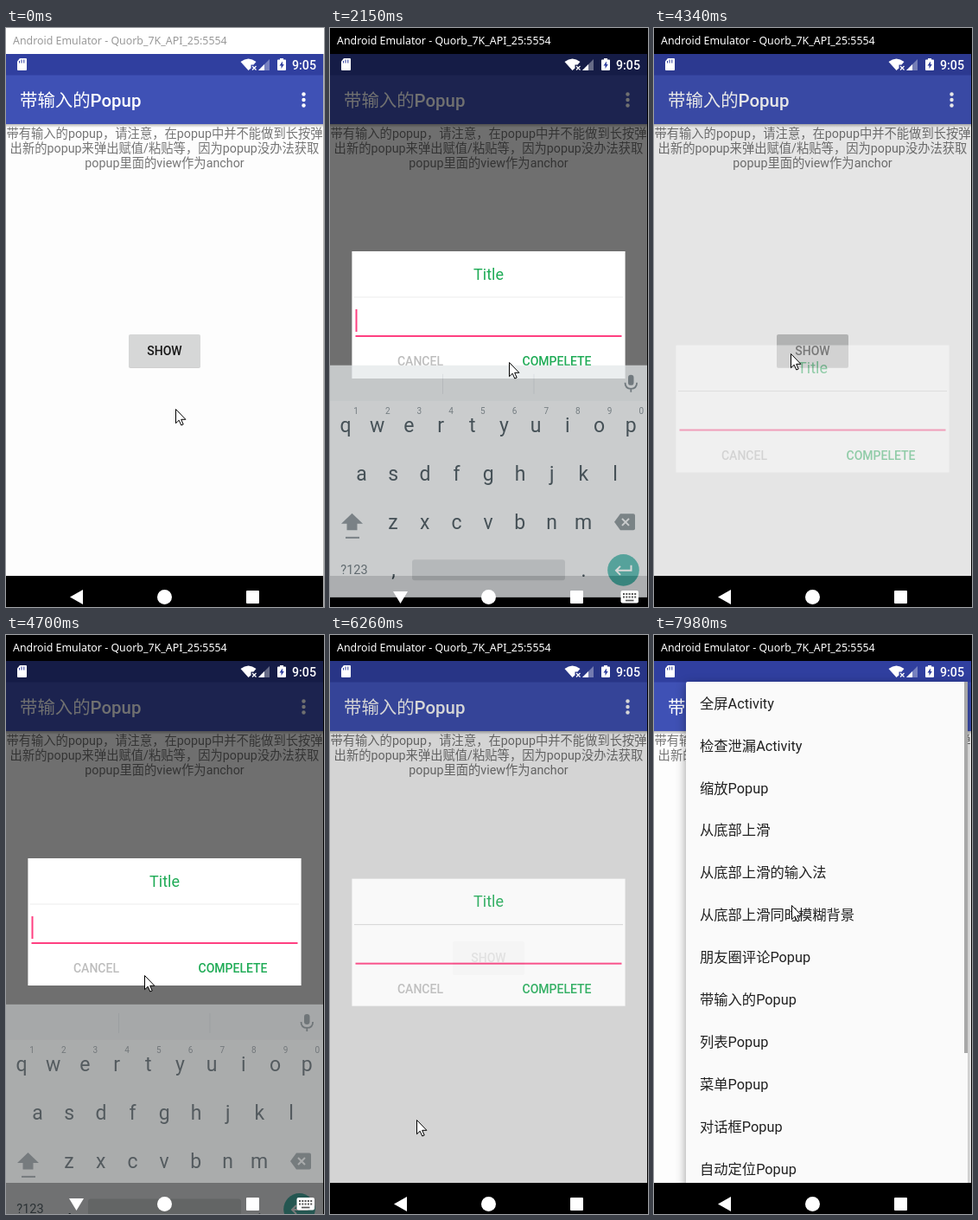
These frames come from a looping animation (368 px wide and 669 px high, 8 s). An HTML page:

```html
<!DOCTYPE html>
<html lang="zh-CN">
<head>
<meta charset="utf-8">
<title>Popup demo</title>
<style>
html, body { margin: 0; width: 100%; height: 100%; overflow: hidden; background: #fff; }
svg { display: block; width: 368px; height: 669px; }
text { font-family: Roboto, "Noto Sans CJK SC", "Noto Sans CJK", sans-serif; white-space: pre; }
.mid { text-anchor: middle; }
.bold { font-weight: 500; }
#caption { font: 12.4px "Noto Sans", sans-serif; }
#menu { filter: drop-shadow(0 3px 6px rgba(0, 0, 0, .4)); }
</style>
</head>
<body>
<svg viewBox="0 0 368 669">
  <defs>
    <linearGradient id="fade" x2="0" y2="1">
      <stop stop-opacity=".28"/><stop offset="1" stop-opacity="0"/>
    </linearGradient>
    <clipPath id="reveal"><rect id="revealBox" y="40"/></clipPath>
    <clipPath id="navArea"><rect y="633" width="368" height="36"/></clipPath>
  </defs>

  <rect id="bar" width="368" height="30"/>
  <text id="caption" x="8" y="19.3">Android Emulator - Quorb_7K_API_25:5554</text>

  <g id="app">
    <rect y="30" width="367" height="603" fill="#fdfdfd"/>
    <rect y="111" width="367" height="4" fill="url(#fade)"/>
    <rect y="30" width="367" height="25" fill="#303f9f"/>
    <rect y="54.5" width="367" height="56.5" fill="#3f51b5"/>
    <g fill="#fff">
      <text x="16" y="91" font-size="20.4">带输入的<tspan class="bold">Popup</tspan></text>
      <circle id="tap" cx="345" cy="83" r="17"/>
      <circle cx="344.5" cy="76.5" r="2.2"/>
      <circle cx="344.5" cy="83" r="2.2"/>
      <circle cx="344.5" cy="89.5" r="2.2"/>
    </g>
    <g class="mid" font-size="14.3" fill="#757575">
      <text x="183.5" y="126.5">带有输入的popup，请注意，在popup中并不能做到长按弹</text>
      <text x="183.5" y="143.5">出新的popup来弹出赋值/粘贴等，因为popup没办法获取</text>
      <text x="183.5" y="160.5">popup里面的view作为anchor</text>
    </g>
    <rect x="142" y="355" width="83" height="38" rx="2" opacity=".18"/>
    <rect id="button" x="142" y="354" width="83" height="38" rx="2"/>
    <text class="mid bold" x="183.5" y="378" font-size="14" fill="#151515">SHOW</text>
  </g>

  <rect id="dim" y="30" width="367" height="603"/>

  <g id="status" fill="#fff">
    <path d="M16 35h7q1 0 1 1v12q0 1-1 1h-9q-1 0-1-1V38.5z"/>
    <path d="M15.5 38v2.500M18 36.500v4M20.800 36.500v4" stroke="#303f9f"/>
    <path d="M280.500 49l-9-10q9-7 18 0l-3 3.500h-3v4z"/>
    <path d="M285 44l4.500 4.500m0-4.500l-4.500 4.500" stroke="#fff" stroke-width="1.3"/>
    <path d="M305 36v13h-13z" opacity=".35"/>
    <path d="M299 42v7h-7z"/>
    <path d="M317 35h4v1.500h2q1 0 1 1V48q0 1-1 1h-8q-1 0-1-1V37.500q0-1 1-1h2z"/>
    <path d="M320 38.500l-3.500 5h2v3.500l3.300-5h-1.800z" fill="#303f9f"/>
    <text class="bold" x="331" y="48" font-size="14.2">9:05</text>
  </g>

  <g id="popup">
    <rect x="25.4" width="316.2" height="147" fill="#fff"/>
    <text class="mid" x="183.5" y="32.5" font-size="18" fill="#1fab56">Title</text>
    <rect id="rule" x="28" y="52.5" width="311" height="1"/>
    <rect x="29.5" y="97" width="308" height="2" fill="#ff4081"/>
    <rect id="caret" x="29.5" y="67" width="2" height="26" fill="#ff4081"/>
    <g class="mid bold" font-size="14">
      <text x="104.5" y="132" fill="#bdbdbd">CANCEL</text>
      <text x="262.5" y="132" fill="#1fab56">COMPELETE</text>
    </g>
  </g>

  <g id="menu"><g clip-path="url(#reveal)" id="menuItems"></g></g>

  <rect y="633" width="367" height="36"/>
  <g id="keyboard" fill="#37474f"></g>
  <g fill="#fff">
    <rect id="backTap" x="27" y="633" width="109" height="48" rx="22" clip-path="url(#navArea)"/>
    <path id="back"/>
    <circle cx="183.5" cy="657.5" r="8.5"/>
    <rect x="278" y="650" width="15" height="15" rx="1"/>
    <g id="imeIcon">
      <rect x="336.5" y="650" width="20.5" height="14.5" rx="2"/>
      <path d="M339 654h16M339 657.500h16" stroke="#555" stroke-width="2" stroke-dasharray="2 1.3"/>
      <path d="M342 661.500h9.500" stroke="#555" stroke-width="1.7"/>
    </g>
  </g>
  <path id="edge" d="M367.500 30v639"/>

  <path id="pointer" d="M.5.5v16.200l3.700-3.500 2.600 5.800 2.400-1-2.500-5.700h5.200z" fill="#fff" stroke="#000"/>
</svg>

<script>
const LOOP = 8000;
const REST_Y = 258, RISE = 73, SLIDE = 113;
const KEYS_Y = 365, KEYS_SHIFT = 67;
const DIM = .56;

const sessions = [
  { press: 1560, open: 1680, keysIn: 2075, rise: 2370, keysOut: 3374, drop: Infinity, close: 3360, blink: 2090 },
  { press: 4160, open: 4290, keysIn: 4694, rise: 4980, keysOut: 5555, drop: 5558, close: 6140, blink: 4680 }
];

// time, x, y
const pointerPath = [
  [770, 196, 440], [1000, 201, 384], [2050, 201, 384], [2140, 207, 386],
  [2370, 207, 386], [2680, 157, 360], [2830, 157, 360], [3150, 150, 350],
  [3560, 150, 350], [3940, 158, 376], [4500, 158, 376], [4690, 160, 393],
  [4980, 160, 393], [5290, 83, 638], [5720, 83, 638], [5890, 100, 560],
  [6260, 100, 560], [6750, 349, 82], [7480, 349, 82], [7920, 163, 308], [7980, 159, 312]
];

const $ = id => document.getElementById(id);
const set = (id, attrs) => {
  for (const name in attrs) $(id).setAttribute(name, attrs[name]);
};
const show = (id, on) => set(id, { visibility: on ? 'visible' : 'hidden' });
const clamp = v => Math.min(1, Math.max(0, v));
const progress = (t, start, length) => clamp((t - start) / length);
const smooth = p => (1 - Math.cos(Math.PI * p)) / 2;
const easeOut = p => 1 - (1 - p) ** 3;
const label = (x, y, size, str, extra = '') =>
  `<text class="mid" x="${x}" y="${y}" font-size="${size}" ${extra}>${str}</text>`;

function buildKeyboard() {
  const pitch = 36.7;
  const row = (letters, x, y) =>
    [...letters].map((c, i) => label(x + i * pitch, y, 23, c)).join('');
  const digits = [...'1234567890']
    .map((c, i) => label(30 + i * pitch, 56.5, 10, c, 'class="bold" opacity=".65"')).join('');

  $('keyboard').innerHTML = `
    <rect width="367" height="268" fill="#eceff1"/>
    <rect width="367" height="41" fill="#e4e8ea"/>
    <path d="M130.500 10v23M236 10v23" stroke="#cfd5d8"/>
    <g opacity=".65">
      <rect x="345" y="11" width="6.5" height="12" rx="3.2"/>
      <path d="M341.500 20q0 7 6.800 7t6.800-7M348.300 27v4" fill="none" stroke="#37474f" stroke-width="1.8"/>
    </g>
    ${digits}
    ${row('qwertyuiop', 18, 77)}
    ${row('asdfghjkl', 36.5, 133)}
    ${row('zxcvbnm', 73, 189)}
    <g opacity=".6">
      <path d="M25.500 171l12.500 12h-6.500v7.500h-12V183H13z"/>
      <rect x="18" y="198" width="16" height="2"/>
      <path d="M336 171.500h15q2 0 2 2v15q0 2-2 2h-15l-7-9.500z"/>
    </g>
    <path d="M338 177l8 8m0-8l-8 8" stroke="#eceff1" stroke-width="2"/>
    ${label(28, 241.5, 14.5, '?123', 'opacity=".8"')}
    ${label(73.5, 244, 23, ',')}
    <rect x="95" y="224.5" width="177" height="24" rx="3" fill="#d0d4d6"/>
    ${label(293.5, 244, 23, '.')}
    <circle cx="339.5" cy="236.5" r="18.3" fill="#4db6ac"/>
    <path d="M348.500 231v6H331m5-5l-5 5 5 5" fill="none" stroke="#fff" stroke-width="2"/>`;
}

function buildMenu() {
  const items = ['全屏Activity', '检查泄漏Activity', '缩放Popup', '从底部上滑', '从底部上滑的输入法',
    '从底部上滑同时模糊背景', '朋友圈评论Popup', '带输入的Popup', '列表Popup', '菜单Popup',
    '对话框Popup', '自动定位Popup'];
  $('menuItems').innerHTML =
    '<rect x="37" y="54" width="326" height="590" rx="2" fill="#fafafa"/>' +
    items.map((s, i) =>
      `<text x="53" y="${84.7 + i * 48.9}" font-size="16.3" fill="#212121">${s}</text>`).join('') +
    '<rect x="359" y="54" width="4" height="429" fill="#a8a8a8"/>';
}

function pointerAt(t) {
  const i = pointerPath.findIndex(p => p[0] > t);
  if (i === 0) return pointerPath[0].slice(1);
  if (i < 0) return pointerPath.at(-1).slice(1);
  const [t0, x0, y0] = pointerPath[i - 1], [t1, x1, y1] = pointerPath[i];
  const p = smooth((t - t0) / (t1 - t0));
  return [x0 + (x1 - x0) * p, y0 + (y1 - y0) * p];
}

function drawPopup(t, s) {
  const opened = smooth(progress(t, s.open, 400));
  const closed = smooth(progress(t, s.close, 400));
  const lift = smooth(progress(t, s.rise, 310)) - smooth(progress(t, s.drop, 310));
  const y = REST_Y + SLIDE * (1 - opened + closed) - RISE * lift;
  show('popup', t >= s.open && t < s.close + 400);
  set('popup', { transform: `translate(0 ${y})`, opacity: (.4 + .6 * opened) * (1 - .6 * closed) });
  set('rule', { fill: y === REST_Y ? '#ededed' : '#d4d4d4' });
  const caretOn = t >= s.blink && t < s.close && (t - s.blink) % 1000 < 500;
  set('caret', { opacity: caretOn ? 1 : 0 });
  set('dim', { opacity: DIM * (progress(t, s.open, 300) - progress(t, s.close, 170)) });
}

function drawKeyboard(t, s) {
  const enter = progress(t, s.keysIn, 270);
  const leave = progress(t, s.keysOut, 160);
  const y = KEYS_Y + KEYS_SHIFT * (1 - easeOut(enter) + leave ** 2);
  const fadeIn = t < s.keysIn ? 0 : .45 + .55 * progress(t, s.keysIn, 150);
  const fadeOut = 1 - clamp(leave / .87) ** 1.7;
  set('keyboard', { transform: `translate(0 ${y})`, opacity: fadeIn * fadeOut });
  const typing = t >= s.keysIn && t < s.keysOut;
  set('back', { d: typing ? 'M73 651h17l-8.500 14z' : 'M74 657.500l15-8.500v17z' });
  show('imeIcon', typing);
}

function render(t) {
  const active = t >= 1560;
  set('bar', { fill: active ? '#000' : '#fff' });
  set('caption', { fill: active ? '#fff' : '#999' });
  set('edge', { stroke: active ? '#000' : '#b4b4b4' });

  const s = sessions[t < sessions[1].press ? 0 : 1];
  drawPopup(t, s);
  drawKeyboard(t, s);

  const pressed = t >= s.press && t < s.press + 240;
  set('button', { fill: pressed ? '#c3c4c4' : '#d6d7d7' });
  set('backTap', { opacity: .17 * (progress(t, 5440, 90) - progress(t, 5660, 230)) });
  set('tap', { opacity: t < 7120 ? 0 : .13 * (1 - progress(t, 7250, 300)) });

  const grow = easeOut(progress(t, 7210, 290));
  set('menu', { opacity: progress(t, 7210, 150) });
  set('revealBox', { x: 363 - 326 * grow, width: 326 * grow, height: 14 + 590 * grow });

  const [x, y] = pointerAt(t).map(Math.round);
  set('pointer', { transform: `translate(${x} ${y})` });
}

buildKeyboard();
buildMenu();
const begun = performance.now();
function tick() {
  render((performance.now() - begun) % LOOP);
  requestAnimationFrame(tick);
}
tick();
</script>
</body>
</html>
```
